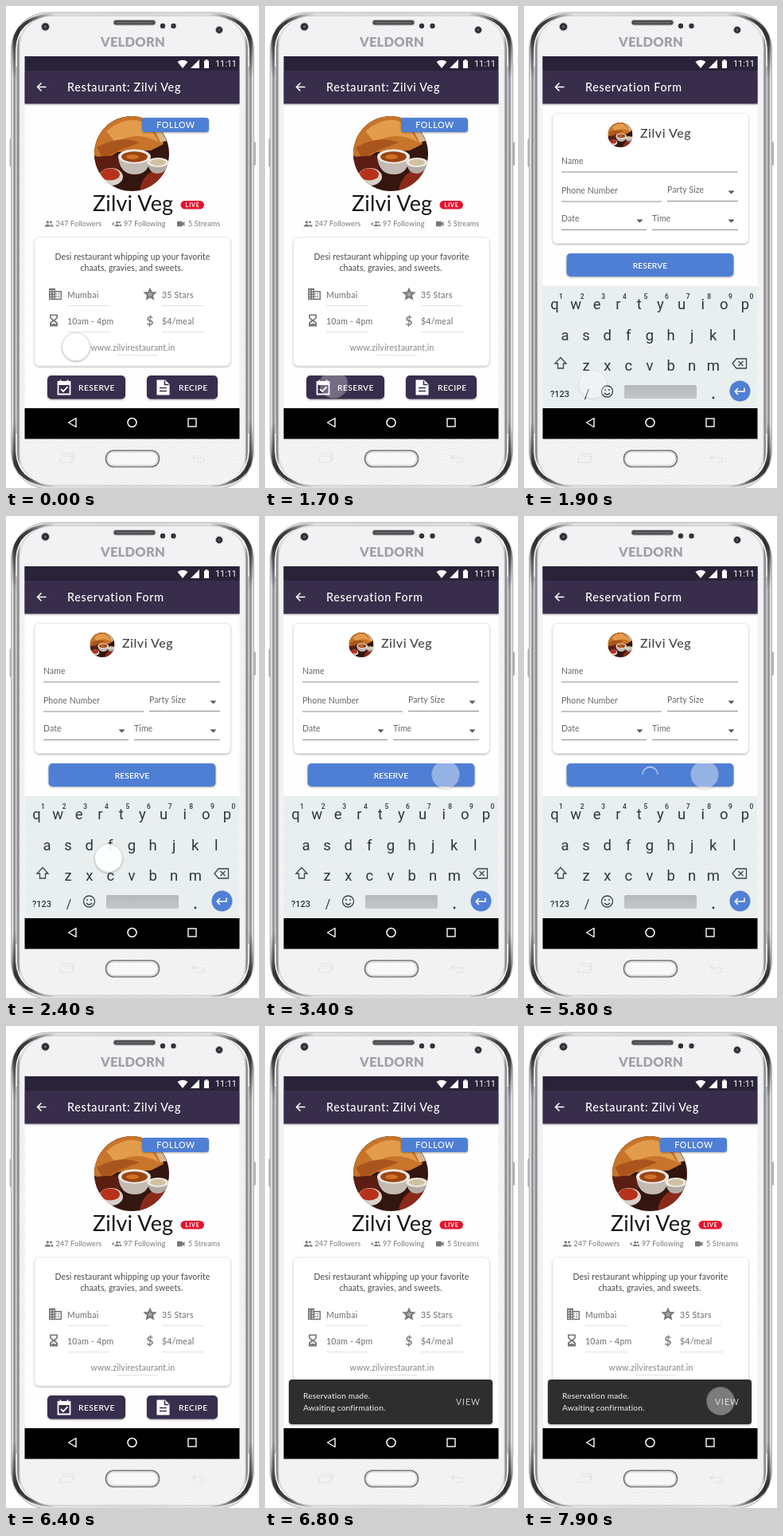
These frames come from a looping animation (318x604 px, 8000 ms). An HTML page:

```html
<!DOCTYPE html>
<html lang="en">
<head>
<meta charset="utf-8">
<title>Restaurant reservation</title>
<style>
  html, body { margin: 0; width: 100%; height: 100%; overflow: hidden; background: #fff; }
  svg { display: block; width: 100vw; height: 100vh; font-family: Lato, "Open Sans", sans-serif; }
  .key { font-family: Roboto, sans-serif; }
</style>
</head>
<body>
<svg id="stage" viewBox="0 0 318 604"></svg>
<script>
const LOOP = 8000, TICK = 100;
const NAME = 'Zilvi Veg';
const INK = '#382f4e', BLUE = '#507fd4', GREY = '#777';

const rect = (x, y, w, h, fill, rx = 0, extra = '') =>
  `<rect x="${x}" y="${y}" width="${w}" height="${h}" rx="${rx}" fill="${fill}" ${extra}/>`;
const circle = (x, y, r, fill, extra = '') =>
  `<circle cx="${x}" cy="${y}" r="${r}" fill="${fill}" ${extra}/>`;
const ellipse = (x, y, rx, ry, fill) =>
  `<ellipse cx="${x}" cy="${y}" rx="${rx}" ry="${ry}" fill="${fill}"/>`;
const text = (x, y, size, str, fill = GREY, spacing = 0, extra = '') =>
  `<text x="${x}" y="${y}" font-size="${size}" fill="${fill}" letter-spacing="${spacing}" ${extra}>${str}</text>`;
const path = (d, fill, extra = '') => `<path d="${d}" fill="${fill}" ${extra}/>`;
const stroke = (d, color, width = 1, extra = '') =>
  path(d, 'none', `stroke="${color}" stroke-width="${width}" ${extra}`);
const hline = (x1, x2, y, color) => stroke(`M${x1} ${y}H${x2}`, color);
const at = (x, y, scale, body) => `<g transform="translate(${x} ${y}) scale(${scale})">${body}</g>`;
const stops = list => list.map(([offset, color, alpha = 1]) =>
  `<stop offset="${offset}" stop-color="${color}" stop-opacity="${alpha}"/>`).join('');
const MID = 'text-anchor="middle"', MEDIUM = 'font-weight="500"', SEMI = 'font-weight="600"';
const SHADOW = 'filter="url(#shadow)"';

const defs = `<defs>
  <filter id="shadow" x="-20%" y="-20%" width="140%" height="150%">
    <feDropShadow dx="0" dy="1" stdDeviation="1" flood-opacity=".34"/></filter>
  <pattern id="dots" width="4" height="4" patternUnits="userSpaceOnUse">
    ${rect(0, 0, 4, 4, '#f8f8f9')}${circle(1, 1, .75, '#dcdce0')}${circle(3, 3, .75, '#dcdce0')}</pattern>
  <linearGradient id="chrome" x1="6" x2="159" gradientUnits="userSpaceOnUse" spreadMethod="reflect">
    ${stops([[0, '#8f8f92'], [.012, '#f2f2f3'], [.03, '#858588'], [.045, '#d6d6d8'], [.06, '#7c7c80'], [.08, '#e4e4e6'], [1, '#d9d9db']])}</linearGradient>
  <linearGradient id="edge" y1="1" x2="1" y2="0">
    ${stops([[0, '#1d1d1f', 0], [.35, '#1d1d1f', .85], [.6, '#1d1d1f', .85], [1, '#1d1d1f', 0]])}</linearGradient>
  <linearGradient id="space" x2="0" y2="1">${stops([[0, '#b5b9bc'], [1, '#c3c7ca']])}</linearGradient>
  <clipPath id="content"><rect x="23.5" y="63" width="270" height="441"/></clipPath>
  <clipPath id="plate"><circle r="47"/></clipPath>
</defs>`;

const corner = (sx, sy) => `<g transform="translate(159 306) scale(${sx} ${sy})">
  ${stroke('M-149 -215V-254Q-148 -292 -96 -295', 'url(#edge)', 5)}
  ${stroke('M-146 -230V-252Q-144 -289 -106 -291', '#fff', 1.2)}</g>`;

const phone = () => rect(4.5, 166, 4, 36, '#b4b4b7', 2) + rect(310, 170, 4, 30, '#b4b4b7', 2)
  + rect(6.5, 8, 305, 597, 'url(#chrome)', 46, 'stroke="#a8a8ab" stroke-width=".8"')
  + [[1, 1], [-1, 1], [1, -1], [-1, -1]].map(s => corner(...s)).join('')
  + rect(17, 12.5, 284, 588, 'url(#dots)', 40, 'stroke="#c8c8cb" stroke-width=".7"')
  + rect(135, 17.5, 53, 6.5, '#4a4a4d', 3.2, 'stroke="#b6b6b9"')
  + stroke('M139 20.8H184', '#8b8b8e', 1.6, 'stroke-dasharray="1 1"')
  + circle(197, 25, 3.2, '#343438') + circle(210.5, 25, 3.2, '#343438')
  + circle(49.5, 26, 5, '#29292d', 'stroke="#b9b9bd"') + circle(49.5, 26, 2, '#555b68')
  + circle(268, 30, 4.5, '#29292d', 'stroke="#b9b9bd"') + circle(268, 30, 1.8, '#555b68')
  + text(159.5, 50.5, 16.5, 'VELDORN', '#a0a2a8', .2, `${MID} font-weight="900"`)
  + rect(125.5, 557, 67, 20.5, '#f4f4f5', 10, 'stroke="#77777b" stroke-width="1.6"')
  + rect(127.5, 559, 63, 16.5, '#f8f8f9', 8, 'stroke="#d0d0d3"')
  + stroke('M71 564h12v8H68v-6M70 561h15v8', '#e2e2e4', 1.2)
  + stroke('M238 563l-4 3 4 3M234 566h11q4 0 4 3t-4 3h-5', '#e2e2e4', 1.2);

const header = title => rect(23.5, 81, 270, 41.5, '#392f4c', 0, SHADOW)
  + rect(23.5, 63, 270, 18, '#2a2239')
  + path('M215.5 70Q222 65.5 228.5 70L222 78ZM232 78L243 67V78Z', '#fff')
  + path('M249 68.5h1.7v-1.5h2.6v1.5H255V78h-6Z', '#fff')
  + text(263, 76, 10.8, '11:11', '#fff', 0, 'class="key"')
  + stroke('M50.5 101.5H39.5M44.5 96.5L39.5 101.5L44.5 106.5', '#fff', 1.5)
  + text(77, 106.5, 14.3, title, '#fff', .7, MEDIUM);

const navBar = () => rect(23.5, 504, 270, 38.5, '#000')
  + stroke('M88 516.5V527.5L78.5 522Z', '#fff', 1.4, 'stroke-linejoin="round"')
  + circle(158.5, 522, 5.5, 'none', 'stroke="#fff" stroke-width="1.5"')
  + rect(229, 517, 10, 10, 'none', 0, 'stroke="#fff" stroke-width="1.4"');

// Soft stand-in for the dish picture, centred on 0,0 with radius 47.
const dish = `<g clip-path="url(#plate)">
  ${rect(-47, -47, 94, 94, '#33160f')}
  ${path('M-48 -12Q-30 -50 8 -47Q34 -34 40 -12L24 -4L-18 -2L-34 8L-48 2Z', '#c8742a')}
  ${path('M-32 -28Q-8 -48 12 -40Q28 -28 34 -14Q8 -30 -20 -14Z', '#e39c4c')}
  ${path('M-44 -8Q-14 -24 10 -14L-18 -3L-36 6Z', '#a9551d')}
  ${path('M10 -46Q34 -40 44 -16L36 -14Q28 -36 10 -46Z', '#d9b58c')}
  ${path('M-47 4L-18 2L-14 22L-30 30L-47 22Z', '#5c1e12')}
  ${ellipse(-26, 29, 15, 11, '#d9d2cc')}${ellipse(-27, 26, 12, 7.5, '#b6321a')}
  ${path('M-17 4Q-15 26 4 26Q22 26 24 4Z', '#c4bab4')}
  ${ellipse(3.5, 3.5, 20.5, 9, '#f1ece6')}${ellipse(3.5, 4, 16.5, 6.8, '#9c4414')}${ellipse(1, 4, 8, 3, '#cf7425')}
  ${path('M10 47Q12 26 34 18L47 22V47Z', '#8c2a1a')}
  ${path('M20 12Q22 25 33 25Q44 24 46 11Z', '#b3aaa5')}
  ${ellipse(33, 11, 13.5, 6, '#efe9e0')}${ellipse(33, 11, 10, 4, '#cfc1a2')}</g>`;

const person = x => circle(x, -2.5, 2, GREY) + path(`M${x - 4.2} 4V2.8Q${x} -1.6 ${x + 4.2} 2.8V4Z`, GREY);
const icons = {
  people: person(-2) + circle(3, -2.5, 1.7, GREY) + path('M3 4V2.6L2 .8Q5.5 .4 6.6 2.8V4Z', GREY),
  addPerson: stroke('M-6 -3V3M-8.5 0H-3.5', GREY, 1.2) + person(1) + circle(5.3, -2.5, 1.6, GREY) + path('M6 4V2.6L5 .8Q8 .6 8.6 2.8V4Z', GREY),
  camera: path('M-5 -3.5H2.5V-1L5.5 -3.4V3.4L2.5 1V3.5H-5Z', GREY),
  building: path('M-8 -7.2H0V-4H8V7.2H-8Z', GREY)
    + stroke('M-5.6 -5V7M-2.2 -5V7', '#fff', 1.5, 'stroke-dasharray="1.5 1.6"')
    + rect(0, -2.4, 6.5, 8, '#fff') + stroke('M1 -1V5M4.2 -1V5', GREY, 1.5, 'stroke-dasharray="1.6 1.5"'),
  hourglass: path('M-5 -7.5H5V-3L1.8 0L5 3V7.5H-5V3L-1.8 0L-5 -3Z', GREY)
    + path('M-3.3 -6H3.3V-3.5L0 -.8L-3.3 -3.5ZM0 1L3 3.8V5L0 3.4L-3 5V3.8Z', '#fff'),
  star: path('M0 -6L1.8 -1.9L6.2 -1.6L2.8 1.4L3.9 5.7L0 3.4L-3.9 5.7L-2.8 1.4L-6.2 -1.6L-1.8 -1.9Z', '#aaa', `stroke="${GREY}" stroke-width="2"`),
  calendar: stroke('M-7.5 -7H7.5V8.5H-7.5Z', '#fff', 1.8) + rect(-8, -7.5, 16, 4.5, '#fff', 1)
    + stroke('M-4.5 -9.5V-6M4.5 -9.5V-6M-4 2L-1 5L4.5 -.8', '#fff', 1.8),
  page: path('M-8 -9.5H2.5L8 -4V9.5H-8Z', '#fff') + stroke('M-4.5 .5H4.5M-4.5 4.5H4.5M2 -8.5V-3.5H7', INK, 1.6),
};

const card = (y, h) => rect(36, y, 246, h, '#fff', 6, `${SHADOW} stroke="#e2e2e2" stroke-width=".6"`);

const fact = (icon, ix, x, y, label, width) => at(ix, y - 4.5, 1, icon)
  + text(x, y, 10.5, label, GREY, .25, MEDIUM) + hline(x, x + width, y + 10, '#e2e2e2');

const darkButton = (x, w, icon, iconX, labelX, label) => rect(x, 463, w, 29.5, INK, 5, SHADOW)
  + at(iconX, 478, 1, icon) + text(labelX, 481.7, 10.3, label, '#fff', .35, SEMI);

const stat = (icon, ix, scale, x, label) =>
  at(ix, 273, scale, icon) + text(x, 276.3, 9, label, GREY, .15);

const profile = () => rect(23.5, 81, 270, 423, '#fefefe')
  + at(158, 185, 1, dish)
  + rect(171, 140, 84, 18, BLUE, 3.5, SHADOW)
  + text(213.5, 153, 10.7, 'FOLLOW', '#fff', .6, `${MID} ${MEDIUM}`)
  + text(109, 257, 27, NAME, '#151515', .15)
  + rect(219.5, 244, 29.5, 10.5, '#e5132f', 5.2)
  + text(234.7, 251.9, 7, 'LIVE', '#fff', .9, `${MID} font-weight="700"`)
  + stat(icons.people, 54, .85, 62.5, '247 Followers')
  + stat(icons.addPerson, 139, .72, 148, '97 Following')
  + stat(icons.camera, 219.5, .9, 229, '5 Streams')
  + card(290, 161)
  + text(159, 317.5, 10.5, 'Desi restaurant whipping up your favorite', '#484848', .1, MID)
  + text(158, 332, 10.5, 'chaats, gravies, and sweets.', '#484848', .1, MID)
  + fact(icons.building, 62, 77, 365.5, 'Mumbai', 53)
  + fact(icons.star, 181, 196, 365.5, '35 Stars', 52)
  + fact(icons.hourglass, 60, 77, 398.5, '10am - 4pm', 53)
  + fact(text(0, 5.5, 16, '$', GREY, 0, `${MID} ${SEMI}`), 181, 196, 398.5, '$4/meal', 54)
  + text(159.5, 431.5, 10.5, 'www.zilvirestaurant.in', '#858585', .15, MID)
  + hline(140, 191, 437.5, '#e2e2e2')
  + darkButton(52, 98, icons.calendar, 73, 91, 'RESERVE')
  + darkButton(177, 89, icons.page, 197.5, 217, 'RECIPE')
  + `<g id="snack">${rect(30, 443, 256, 56, '#2d2d2d', 4, SHADOW)}
     ${text(48, 467, 10.2, 'Reservation made.', '#f2f2f2', .12)}
     ${text(48, 481.5, 10.2, 'Awaiting confirmation.', '#f2f2f2', .12)}
     ${text(240, 475, 10.5, 'VIEW', '#c9c9c9', 1)}</g>`
  + header(`Restaurant: ${NAME}`);

const field = (x1, x2, y, label, menu) => text(x1, y, 10.5, label, '#666', .1)
  + hline(x1, x2, y + 10.5, '#8d8d8d')
  + (menu ? path(`M${x2 - 12.5} ${y - 2.5}h8l-4 4Z`, '#555') : '');

const keyRow = (letters, x, y) => [...letters].map((c, i) =>
  text(x + i * 26.6, y, 18.5, c, '#2f373b', 0, `class="key" ${MID}`)).join('');

const keyboard = () => rect(23.5, 351, 270, 153, '#e9eeef')
  + keyRow('qwertyuiop', 38.5, 379.5) + keyRow('asdfghjkl', 51.5, 418.5) + keyRow('zxcvbnm', 78.2, 457)
  + [...'1234567890'].map((d, i) => text(46.5 + i * 26.6, 366.5, 8.5, d, '#2f373b', 0, `class="key" ${MEDIUM} ${MID}`)).join('')
  + stroke('M46 440.5L53 448H49.5V454H42.5V448H39Z', '#3b4346', 1.3)
  + stroke('M267 442H279.5V454H267L262 448ZM269.5 445L275.5 451M275.5 445L269.5 451', '#3b4346', 1.3)
  + text(33, 490, 11, '?123', '#2f373b', 0, `class="key" ${MEDIUM}`)
  + text(79, 492, 16, '/', '#2f373b', 0, `class="key" ${MID}`)
  + circle(104.5, 483, 7, 'none', 'stroke="#3b4346" stroke-width="1.3"')
  + circle(102, 481, 1, '#3b4346') + circle(107, 481, 1, '#3b4346') + stroke('M101 485Q104.5 489 108 485', '#3b4346', 1.3)
  + rect(126, 475, 91, 17, 'url(#space)', 2)
  + circle(238, 491, 1.4, '#2f373b')
  + circle(271.5, 482.5, 13, BLUE)
  + stroke('M277 478.5V483H265.5M269 479L265.2 483L269 487', '#fff', 1.5);

const form = () => rect(23.5, 81, 270, 423, '#fefefe')
  + card(134.5, 163)
  + at(121, 161.5, .33, dish) + text(146, 164.5, 16, NAME, '#444', .5, MEDIUM)
  + field(47, 269, 197.5, 'Name')
  + field(47, 173, 234.5, 'Phone Number') + field(180, 269, 234, 'Party Size', true)
  + field(47, 154, 270, 'Date', true) + field(161, 269, 270, 'Time', true)
  + rect(53.5, 310, 210, 29, BLUE, 5, SHADOW)
  + `<g id="label">${text(158.5, 328.7, 10.3, 'RESERVE', '#fff', 0, `${MID} ${SEMI}`)}</g>`
  + `<g transform="translate(158.5 325)"><g id="spinner">${stroke('M-9.5 -1A9.5 9.5 0 0 1 9.5 -1', '#c3d3f2', 1.4)}</g></g>`
  + keyboard() + header('Reservation Form');

document.getElementById('stage').innerHTML = defs + phone()
  + `<g clip-path="url(#content)">${profile()}<g id="form">${form()}</g>
     <g id="pointer">${circle(0, 0, 17.5, '#fff', `${SHADOW} stroke="#c9c9c9" stroke-width=".7"`)}</g></g>`
  + navBar();

// The stepped timing holds every pose for one tick.
const play = (id, steps) => document.getElementById(id).animate(
  steps.map(([time, frame, easing = 'linear']) => ({ offset: time / LOOP, easing, ...frame })),
  { duration: LOOP, iterations: Infinity, easing: `steps(${LOOP / TICK})` });
const move = (x, y) => ({ transform: `translate(${x}px, ${y}px)` });
const spin = deg => ({ transform: `rotate(${deg}deg)` });
const fade = opacity => ({ opacity });
const HOLD = 'step-end';

// Switches fall half a tick early so that rounding cannot delay them.
const toggle = (id, on, off) => play(id, [
  [0, fade(0), HOLD], [on - TICK / 2, fade(1), HOLD], [off - TICK / 2, fade(0), HOLD], [LOOP, fade(0)]]);

toggle('form', 1900, 6400);
toggle('spinner', 3600, 6400);
play('label', [[0, fade(1), HOLD], [3600 - TICK / 2, fade(0), HOLD], [LOOP, fade(0)]]);
play('spinner', [[0, spin(84)], [LOOP, spin(3444)]]);
play('snack', [[0, move(0, 66)], [6400, move(0, 66), 'ease-out'], [6700, move(0, 0)], [LOOP, move(0, 0)]]);
play('pointer', [
  [0, move(88, 427)], [1000, move(88, 427), 'ease-in-out'], [1500, move(86.5, 474)],
  [2000, move(86.5, 474), 'ease-in-out'], [3050, move(227, 324), HOLD],
  [6350, move(247, 470)], [LOOP, move(247, 470)]]);
play('pointer', [
  [0, fade(.94)], [1500, fade(.94)], [1700, fade(.3)], [1900, fade(.3)],
  [2200, fade(.9)], [3100, fade(.9)], [3400, fade(.4), HOLD],
  [6350, fade(0)], [7300, fade(0)], [7600, fade(.38)], [LOOP, fade(.38)]]);
</script>
</body>
</html>
```
